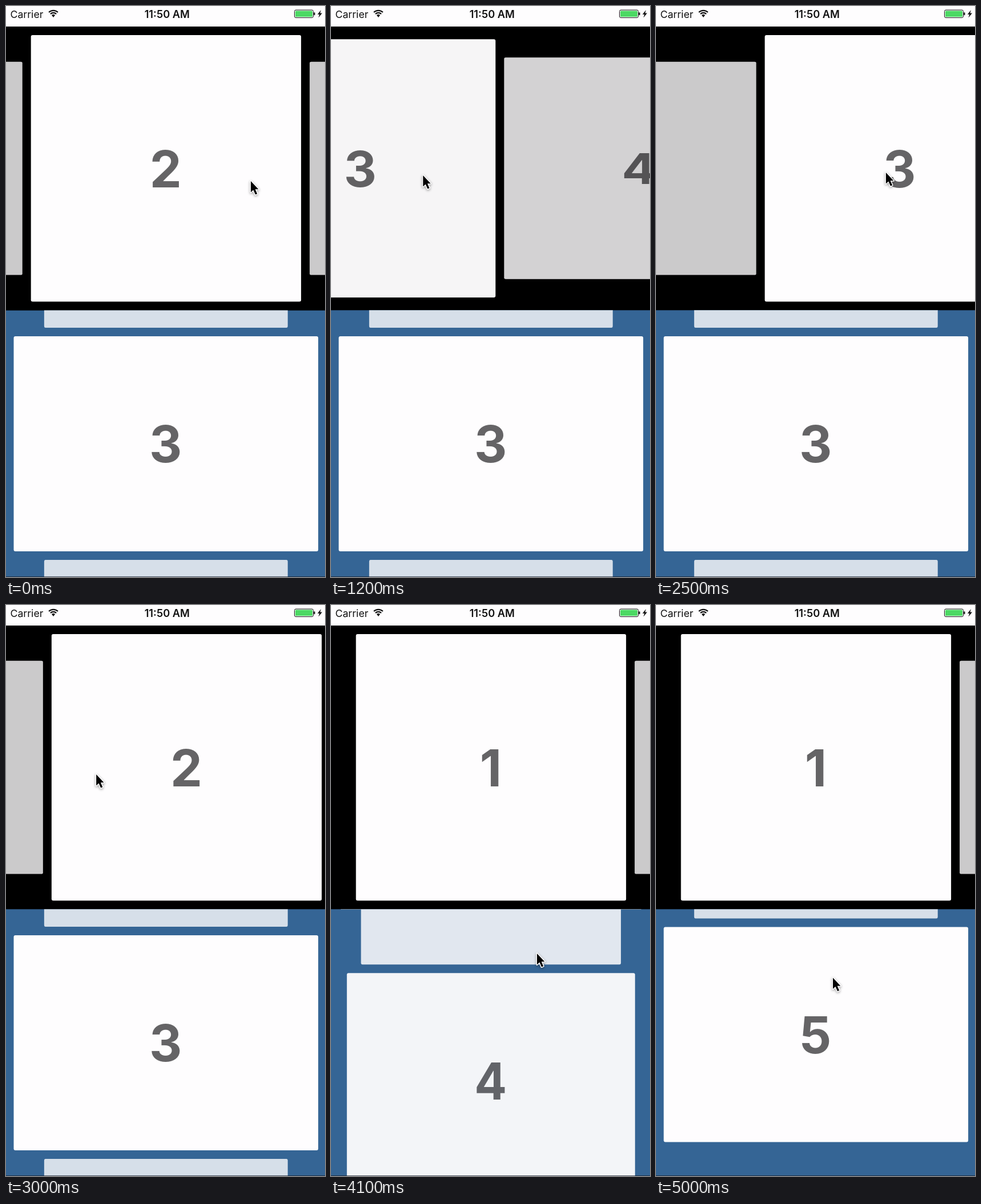
Write an HTML page with a canvas that moves like this. It is 559 px wide and 1001 px high and loops after 5.1 s.

```html
<!DOCTYPE html>
<html lang="en">
<head>
<meta charset="utf-8">
<title>Card carousels</title>
<style>
html, body { margin: 0; width: 100%; height: 100%; overflow: hidden; background: #000; }
canvas { display: block; }
</style>
</head>
<body>
<canvas id="stage" width="559" height="1001"></canvas>
<script>
const ctx = document.getElementById('stage').getContext('2d');
const LOOP = 5100, STEP = 100;
const RELEASE = 0.37;   // share of a page dragged before letting go
const SETTLE = 200;     // ms from release to rest
const GAP = 15, CARDS = 5;
const CARD = [254, 253, 254], DIGIT = [101, 100, 102];

const clamp = v => Math.max(0, Math.min(1, v));
const ease = v => v * v * (3 - 2 * v);
const mix = (a, b, k) => a + (b - a) * k;
const rgb = c => `rgb(${c})`;

const swipe = (press, release, dir, x, y) => ({ press, release, dir, x, y });

const decks = [
  { top: 36, bottom: 533.4, color: [0, 0, 0], cx: 280.4, cy: 284.6, w: 473.4, h: 467.4,
    horizontal: true, first: 2,
    swipes: [
      swipe(0, 390, 1, 429, 307),
      swipe(800, 1150, 1, 342, 297),
      swipe(1550, 1913, -1, 175, 297),
      swipe(2300, 2546, -1, 256, 292),
      swipe(2960, 3160, -1, 122, 297),
    ] },
  { top: 533.4, bottom: 1001, color: [53, 101, 149], cx: 280.3, cy: 767.4, w: 533.6, h: 377,
    horizontal: false, first: 3,
    swipes: [
      swipe(3740, 3968, 1, 361, 756),
      swipe(4400, 4520, 1, 330, 740),
      swipe(4750, 7250, 1, 310, 668),   // slow pull past the last card
    ] },
];

const pitch = deck => (deck.horizontal ? deck.w : deck.h) + GAP;
const dragAt = (s, t) => RELEASE * clamp((t - s.press) / (s.release - s.press));
const gestures = decks.flatMap(deck => deck.swipes.map(s => ({ ...s, deck })));

function scrollAt(deck, t) {
  let card = deck.first;
  for (const s of deck.swipes) {
    if (t < s.press) break;
    if (t < s.release + SETTLE) {
      const settle = ease(clamp((t - s.release) / SETTLE));
      const moved = dragAt(s, t) + (1 - RELEASE) * settle;
      return { card, next: card + s.dir, settle, position: card + s.dir * moved };
    }
    card += s.dir;
  }
  return { card, next: 0, settle: 0, position: card };
}

// The pointer drags with each swipe, rests, then glides to the next press.
function pointerAt(t) {
  const i = gestures.findLastIndex(g => t >= g.press);
  const g = gestures[i], next = gestures[i + 1];
  const drag = -g.dir * dragAt(g, t) * pitch(g.deck);
  const x = g.x + (g.deck.horizontal ? drag : 0);
  const y = g.y + (g.deck.horizontal ? 0 : drag);
  if (!next) return [x, y];
  const start = Math.max(g.release, next.press - 300), end = next.press - 50;
  const k = ease(clamp((t - start) / (end - start)));
  return [mix(x, next.x, k), mix(y, next.y, k)];
}

function drawDeck(deck, t) {
  const { top, bottom, color, cx, cy, w, h, horizontal } = deck;
  const { card, next, settle, position } = scrollAt(deck, t);
  ctx.save();
  ctx.beginPath();
  ctx.rect(0, top, 559, bottom - top);
  ctx.clip();
  ctx.fillStyle = rgb(color);
  ctx.fillRect(0, top, 559, bottom - top);
  ctx.font = '700 89px Inter, sans-serif';
  ctx.textAlign = 'center';
  for (let n = 1; n <= CARDS; n++) {
    const focus = n === card ? 1 - settle : n === next ? settle : 0;
    const scale = 0.8 + 0.2 * focus;   // also the card's opacity
    const tint = c => rgb(c.map((v, i) => mix(color[i], v, scale)));
    const shift = (n - position) * pitch(deck);
    ctx.save();
    ctx.translate(cx + (horizontal ? shift : 0), cy + (horizontal ? 0 : shift));
    ctx.scale(horizontal ? 1 : scale, horizontal ? scale : 1);
    ctx.fillStyle = tint(CARD);
    ctx.beginPath();
    ctx.roundRect(-w / 2, -h / 2, w, h, 3);
    ctx.fill();
    ctx.fillStyle = tint(DIGIT);
    ctx.fillText(n, -0.5, 33);
    ctx.restore();
  }
  ctx.restore();
}

function pill(x, y, w, h, r, paint = 'fill') {
  ctx.beginPath();
  ctx.roundRect(x, y, w, h, r);
  ctx[paint]();
}

const bolt = new Path2D('M552 7 L545.8 14.8 H549.2 L547.5 20.5 L554 12.6 H550.4 Z');

function drawStatusBar() {
  ctx.fillStyle = '#fefdfe';
  ctx.fillRect(0, 0, 559, 36);
  ctx.fillStyle = ctx.strokeStyle = '#111';
  ctx.textAlign = 'left';
  ctx.font = '400 17.7px Inter, sans-serif';
  ctx.fillText('Carrier', 7.5, 20.5);
  ctx.textAlign = 'center';
  ctx.font = '600 18.3px Inter, sans-serif';
  ctx.fillText('11:50 AM', 282.3, 20.5);

  // Signal
  const from = -Math.PI * 0.75, to = -Math.PI * 0.25;
  ctx.lineWidth = 2.2;
  for (const r of [7.2, 11.2]) {
    ctx.beginPath();
    ctx.arc(83, 19, r, from, to);
    ctx.stroke();
  }
  ctx.beginPath();
  ctx.moveTo(83, 20);
  ctx.arc(83, 19, 4.2, from, to);
  ctx.fill();

  // Battery
  ctx.lineWidth = 1;
  pill(505.5, 7, 33, 13.5, 2.5, 'stroke');
  pill(539.3, 11.2, 2.2, 5, 1);
  ctx.fill(bolt);
  ctx.fillStyle = '#4cd964';
  pill(507, 8.5, 30, 10.5, 1.2);
}

const arrow = new Path2D('M0 0 V19.5 L4.4 15.4 L8 23.6 L11.2 22.2 L7.7 14.2 H13.4 Z');

function drawPointer(t) {
  ctx.save();
  ctx.translate(...pointerAt(t));
  ctx.lineJoin = 'round';
  ctx.strokeStyle = '#fff';
  ctx.lineWidth = 3;
  ctx.shadowColor = 'rgba(0,0,0,.4)';
  ctx.shadowBlur = 4;
  ctx.shadowOffsetY = 1.5;
  ctx.stroke(arrow);
  ctx.shadowColor = 'transparent';
  ctx.fillStyle = '#000';
  ctx.fill(arrow);
  ctx.restore();
}

function render(now) {
  const t = Math.floor((now % LOOP) / STEP) * STEP;
  decks.forEach(deck => drawDeck(deck, t));
  drawStatusBar();
  ctx.fillStyle = 'rgba(20,30,45,.75)';
  ctx.fillRect(0, 1000, 559, 1);
  drawPointer(t);
  requestAnimationFrame(render);
}
requestAnimationFrame(render);
</script>
</body>
</html>
```
